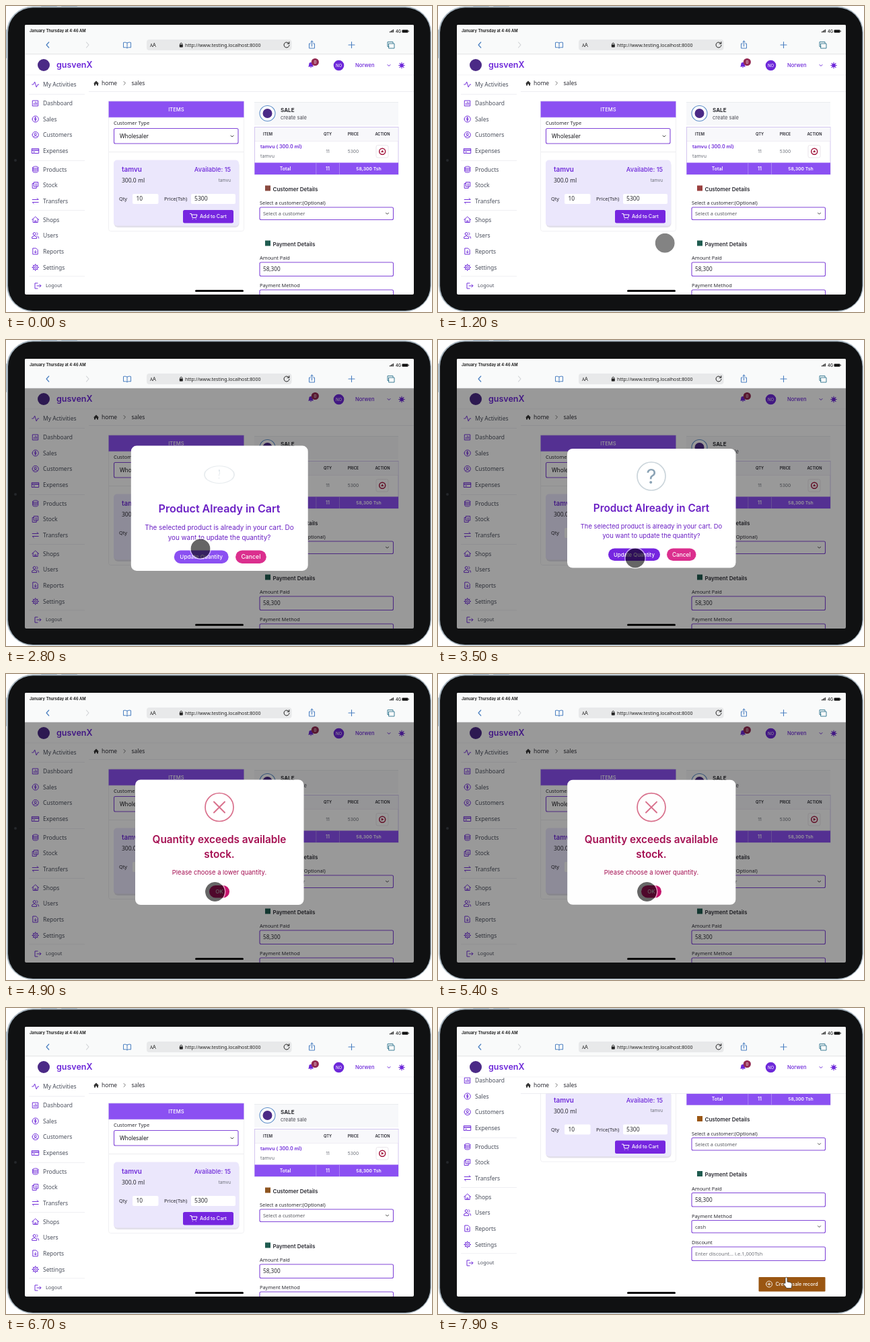
An HTML page for the animation above (8000 ms loop, 633 by 456 pixels).

```html
<!DOCTYPE html>
<html lang="en">
<head>
<meta charset="utf-8">
<title>Point of sale on a tablet</title>
<style>
html, body { margin: 0; width: 100%; height: 100%; overflow: hidden; background: #fff; }
svg { display: block; width: 633px; height: 456px; }
text { font-family: Inter, sans-serif; white-space: pre; }
.n { font-family: "Noto Sans", sans-serif; }
.d { font-weight: 500; }
.b { font-weight: 600; }
.m { text-anchor: middle; }
.e { text-anchor: end; }
</style>
</head>
<body>
<svg id="stage" viewBox="0 0 633 456"></svg>
<script>
const LOOP = 8000;
const PURPLE = '#6d28d9', VIOLET = '#8b50f2', BUTTON = '#7626e0', PRESSED = '#5c16c4';
const INK = '#2b2b33', GREY = '#6b6f78', BLUE = '#4a7fc1';
const BRAND = 'gusvenX', USER = 'Norwen', PRODUCT = 'tamvu';

// Drawing helpers
const text = (s, x, y, size, fill, cls = '') =>
  `<text x="${x}" y="${y}" font-size="${size}" fill="${fill}" class="${cls}">${s}</text>`;
const rect = (x, y, w, h, fill, r = 0, more = '') =>
  `<rect x="${x}" y="${y}" width="${w}" height="${h}" rx="${r}" fill="${fill}" ${more}/>`;
const circle = (x, y, r, fill, more = '') =>
  `<circle cx="${x}" cy="${y}" r="${r}" fill="${fill}" ${more}/>`;
const line = (d, color, width = 1, x = 0, y = 0) =>
  `<path d="${d}" transform="translate(${x} ${y})" fill="none" stroke="${color}" stroke-width="${width}" stroke-linecap="round" stroke-linejoin="round"/>`;
const group = (id, body, more = '') => `<g id="${id}" ${more}>${body}</g>`;
const stroke = (color, width = 1) => `stroke="${color}" stroke-width="${width}"`;
const chevron = (x, y, color = '#444') => line('M-2-1l2 2 2-2', color, 1, x, y);
const field = (x, y, w, h) => rect(x, y, w, h, '#fff', 2, stroke('#8146d8', 1.1));
const ring = r => `M${-r} 0a${r} ${r} 0 1 0 ${2 * r} 0a${r} ${r} 0 1 0 ${-2 * r} 0`;

const device =
  [52, 82].map(x => rect(x, 0, 24, 3, '#a3b6c6', 1)).join('') +
  rect(0, 35, 3, 43, '#b4c3cf', 1) +
  rect(1, .5, 631, 455, '#a7b5bf', 39) + rect(3, 2.5, 627.5, 451.5, '#101112', 37) +
  circle(14, 230, 2, '#24272b') + rect(28, 28, 578, 402, '#fff', 2);

const chrome =
  rect(28, 28, 578, 44, '#f9fafa', 2) + rect(28, 71.5, 578, .6, '#d4d6d8') +
  text('January Thursday at 4:46 AM', 35, 39, 5.8, '#111', 'b') +
  [0, 1, 2, 3].map(i => rect(570 + i * 1.6, 39 - i - 1, 1.1, i + 1.4, '#111')).join('') +
  text('4G', 579, 39.5, 5.8, '#111', 'd') + rect(588.5, 35.5, 9, 4.2, '#111', 1) + rect(598, 36.8, .8, 1.6, '#111') +
  line('M1.7-4l-3.6 4 3.6 4', BLUE, 1.2, 62, 58) + line('M-1.5-4l3.5 4-3.5 4', '#cfd2d5', 1.1, 121, 58) +
  line('M0-3q-3-1.6-5.5-.6v7.5q3-.8 5.5.6 2.500-1.400 5.500-.6v-7.500q-2.500-1-5.500.6v7.500', BLUE, 1, 180, 58) +
  rect(209, 50, 215.500, 16, '#e8e9ea', 4) +
  text('A', 214, 61, 6, '#222') + text('A', 217.800, 61, 7.600, '#222') +
  rect(257.800, 57.500, 5, 4, '#222', .8) + line('M-1.500 0v-1.500q1.500-2 3 0v1.500', '#222', .9, 260.300, 57.500) +
  text('http://www.testing.localhost:8000', 266, 61, 7.100, '#222', 'n') +
  line('M3.500-2a4 4 0 1 0 .5 2.500M3.800-4.500v2.700h-2.700', '#222', 1, 417, 58) +
  line('M-2-2h-2v7h8v-7h-2M0 2v-8M-2-4l2-2 2 2', BLUE, 1, 454.500, 58) +
  line('M-4.500 0h9M0-4.500v9', BLUE, 1.100, 513.500, 58) +
  line('M-3-2h8v7h-8zM-3 2.500h-2v-7h8v2', '#3f7f96', 1, 572, 58);

const sun = [0, 45, 90, 135].map(a =>
  `<path d="M-4.700 0h9.400" transform="translate(588 88.500) rotate(${a})" stroke="${PURPLE}" stroke-width="1.100"/>`).join('');

const header =
  rect(28, 72, 578, 31, '#fff') + rect(123, 103, 483, 24, '#fff') +
  rect(28, 102.500, 578, .7, '#eeeef2') + rect(123, 127, 483, .7, '#e6e6ec') +
  circle(56, 88, 9, '#4b2a86') + text(BRAND, 75, 92.300, 12.500, PURPLE, 'b') +
  `<path d="M449 90.500q1.200-1 1.200-3.500 0-3 2.800-3t2.800 3q0 2.500 1.200 3.500zM452 91.300h2q-1 1.700-2 0z" fill="${PURPLE}"/>` +
  circle(459.300, 83.500, 5.600, '#932a52') + text('0', 459.300, 85.700, 6, '#fff', 'm') +
  circle(494.500, 88.500, 7.800, PURPLE) + text('NO', 494.500, 90.800, 6, '#fff', 'm') +
  text(USER, 519, 91, 7.600, PURPLE, 'd') + chevron(569, 88.500, PURPLE) + sun + circle(588, 88.500, 2.600, PURPLE) +
  `<path d="M130 115.500l4-4 4 4h-1v3h-2v-2h-2v2h-2v-3z" fill="#333"/>` +
  text('home', 142, 118.200, 8.500, INK, 'n') + line('M-1.500-2.500l2.500 2.500-2.500 2.500', '#666', .9, 176.500, 115) +
  text('sales', 186.500, 118.200, 8.500, INK, 'n');

const menu = [
  ['My Activities', 117, 'M-5 0h2l2-4 2.500 8 2-4h1.500'],
  ['Dashboard', 145, 'M-4-4h8v8h-8zM-2 2v-2M0 2v-4M2 2v-3'],
  ['Sales', 168.500, ring(4.600) + 'M1.500-1.300c-1-1.200-3-.6-3 .3s3 .7 3 1.700-2 1.400-3 .3M0-3v6'],
  ['Customers', 192, ring(4.600) + 'M-1.500-1a1.500 1.500 0 1 0 3 0a1.500 1.500 0 1 0-3 0M-3 3c1-2 5-2 6 0'],
  ['Expenses', 216, 'M-5-3.500h10v7h-10zM-5-1h10M-5-1.500h10M-3 1.500h2'],
  ['Products', 243.500, 'M-4-3c0-2 8-2 8 0s-8 2-8 0v6c0 2 8 2 8 0v-6M-4-1c0 2 8 2 8 0M-4 1c0 2 8 2 8 0'],
  ['Stock', 267, 'M-2-4.500h6v6.500h-6zM-2-2.500h-2.500v7h6v-2.500M0-2h2M0 0h2'],
  ['Transfers', 290.500, 'M-4.500-2h9l-2-2M4.500 2h-9l2 2'],
  ['Shops', 318.500, 'M-5 0l5-4.500 5 4.500M-3.500-1v5h7v-5M-1 4v-2.500h2v2.500'],
  ['Users', 342, 'M-3.500-2.500a2 2 0 1 0 4 0a2 2 0 1 0-4 0M-5 4v-2q3.500-3 7 0v2zM2-4.500q3 2 0 4M3.500 1q1.500 1 1.500 3'],
  ['Reports', 365.500, 'M-3.500-4.500h4.500l2.500 2.500v6.500h-7zM0-1v3.500M-1.500 1l1.500 1.500 1.500-1.500'],
  ['Settings', 389.500, ring(3.600) + ring(1.500) + 'M0-3.600v-1.200M0 3.600v1.200M-3.600 0h-1.200M3.600 0h1.200M-2.600-2.600l-.8-.8M2.600 2.600l.8.8M2.600-2.600l.8-.8M-2.600 2.600l-.8.8']
];
const sidebar =
  menu.map(([label, y, icon]) => line(icon, PURPLE, .95, 43.700, y) + text(label, 55, y + 3, 8.500, '#4a4f5c', 'n')).join('') +
  line('M0-4h-4v8h4M-1 0h6l-2-2M5 0l-2 2', PURPLE, .95, 47, 417) + text('Logout', 59, 419.300, 7.300, '#4a4f5c', 'n') +
  [131, 230, 304, 402.500].map(y => rect(34, y, 83, .7, '#e9e9ee')).join('');

const items =
  rect(152.500, 141.500, 201, 194, '#fff', 3, stroke('#ececf0', .8)) +
  rect(152.500, 142, 201, 24, VIOLET, 0, stroke('#c9b6f3', .6)) + text('ITEMS', 253, 156.700, 7.600, '#fff', 'd m') +
  text('Customer Type', 160, 177, 7.500, INK, 'n') + field(160.500, 182.500, 184.500, 22.500) +
  text('Wholesaler', 169, 196.600, 8.200, '#15151a', 'n') + chevron(336, 194) + rect(153, 217, 200, .7, '#e6e6ea') +
  rect(160.500, 231, 186, 99, '#e2e0ea', 6) + rect(160, 229.500, 186, 98, '#ebe7fc', 5) +
  text(PRODUCT, 172, 247.300, 9.900, PURPLE, 'b') + text('Available: 15', 334, 247.200, 9.200, PURPLE, 'd e') +
  text('300.0 ml', 172, 263, 8.500, INK, 'n') + text(PRODUCT, 334, 261.700, 6.300, GREY, 'e') +
  text('Qty', 168, 290, 7.300, INK, 'n') + rect(188, 280, 38.500, 15, '#fff', 2) + text('10', 193.500, 290.400, 8.400, INK, 'n') +
  text('Price(Tsh)', 235, 290, 7.600, INK, 'n') + rect(275, 280, 66, 15, '#fff', 2) + text('5300', 280, 290.400, 8.600, INK, 'n') +
  rect(263, 304, 75, 19.500, BUTTON, 2.500, 'id="add"') +
  line('M-5-4h2l1.500 6h5.500l1.500-4.500h-8M-1.300 4.200h.1M3.700 4.200h.1', '#fff', 1, 278.500, 313.500) +
  text('Add to Cart', 288, 315.700, 7.300, '#fff', 'd');

const sale =
  rect(369, 143, 214, 35, '#f7f8fa') + rect(369, 143, 214, .7, '#e6e7eb') +
  circle(388.500, 160, 11.500, '#fff', stroke('#5e8fc9', 1.100)) + circle(388.500, 160, 7, '#4b2a86') +
  text('SALE', 408, 158, 8.100, '#16161c', 'b') + text('create sale', 408, 169, 7.500, '#4a4a52') +
  rect(369.500, 180.500, 213.500, 70.500, '#fff', 0, stroke('#cfc0ee', .9)) + rect(370, 181, 212.500, 20, '#f8f8fb') +
  text('ITEM', 382, 193, 5.700, INK, 'b') +
  [['QTY', 478], ['PRICE', 516], ['ACTION', 559.500]].map(([s, x]) => text(s, x, 193, 5.700, INK, 'b m')).join('') +
  rect(370, 201, 213, .6, '#e6e2ef') + text(`${PRODUCT} ( 300.0 ml)`, 378, 211.700, 7.200, PURPLE, 'b') +
  text(PRODUCT, 378, 226, 7.200, GREY) + text('11', 478, 219, 6.800, GREY, 'm') + text('5300', 516, 219, 6.600, GREY, 'm') +
  rect(550, 207.500, 18, 18.500, '#fff', 2.500, stroke('#e5dfe6', .8)) +
  group('action', circle(0, 0, 4.500, 'none', stroke('#a3173f', 1.500)) + '<path d="M0-2.300l2.100 3.700h-4.200z" fill="#a3173f"/>') +
  rect(369.500, 233.500, 213.500, 17.500, VIOLET) + [460.500, 495].map(x => rect(x, 234, .7, 17, '#b79af5')).join('') +
  text('Total', 415, 244.800, 6.900, '#fff', 'b m') + text('11', 478, 244.800, 6.900, '#fff', 'b m') + text('58,300 Tsh', 539, 244.800, 6.800, '#fff', 'b m');

const label = (s, y) => text(s, 377, y, 7.400, INK, 'n');
const formField = (s, y, h, color, size, select) =>
  field(377, y, 198.500, h) + text(s, 382, y + h / 2 + 2.800, size, color, 'n') + (select ? chevron(566.500, y + h / 2) : '');
const form =
  rect(385, 267.500, 8, 8, '#8a4a40', 0, 'id="swatch"') + text('Customer Details', 396.500, 275.700, 8.050, INK, 'b') +
  label('Select a customer:(Optional)', 296) + formField('Select a customer', 300, 18.500, '#55565e', 7.500, true) +
  rect(385, 349.500, 8, 8, '#1f5c50') + text('Payment Details', 396.500, 357.700, 8.050, INK, 'b') +
  label('Amount Paid', 378) + formField('58,300', 382, 20.500, INK, 8.200) +
  label('Payment Method', 419) + formField('cash', 423, 18.500, '#44454d', 7.500, true) +
  label('Discount', 458.500) + formField('Enter discount... i.e.1,000Tsh', 462.500, 20.500, '#70727a', 7.500) +
  rect(476.500, 507.500, 99, 21.500, '#99550f', 1, 'id="create"') +
  line(ring(4.500) + 'M-2 0h4M0-2v4', '#fff', .9, 492, 518) + text('Create sale record', 501.500, 520.600, 7.200, '#fff', 'd');

const DEEP = '#6a1fc4', CRIMSON = '#a50f52';
const question =
  rect(192, 162, 250.500, 177.500, '#fff', 8) +
  group('askIcon', circle(317, 203, 21, 'none', stroke('#cbd5db', 1.700)) + group('askMark', text('?', 317, 213.500, 30, '#8ba3b5', 'm'))) +
  text('Product Already in Cart', 317, 256.300, 15.300, DEEP, 'b m') +
  text('The selected product is already in your cart. Do', 317, 281.300, 9.400, DEEP, 'm') +
  text('you want to update the quantity?', 317, 295.300, 9.400, DEEP, 'm') +
  rect(253, 310.500, 77, 18.500, VIOLET, 9.250, 'id="update"') + text('Update Quantity', 291.500, 322.600, 7.800, '#fff', 'd m') +
  rect(340, 310.500, 43.500, 18.500, '#db2f8e', 9.250) + text('Cancel', 361.700, 322.800, 8.300, '#fff', 'd m');
const error =
  rect(192, 157.500, 250.500, 186.500, '#fff', 8) +
  group('errIcon', circle(317, 198.500, 21, 'none', stroke('#d9708c', 1.700)) + group('errMark', line('M-8-8L8 8M8-8L-8 8', '#d9708c', 2, 317, 198.500))) +
  text('Quantity exceeds available', 317, 252.300, 15.300, CRIMSON, 'b m') + text('stock.', 317, 274.300, 15.300, CRIMSON, 'b m') +
  text('Please choose a lower quantity.', 317, 299.200, 9.400, CRIMSON, 'm') +
  rect(302, 315, 30, 18.500, '#c5146c', 9.250) + text('OK', 317, 327, 7.800, '#fff', 'd m');

document.getElementById('stage').innerHTML =
  `<clipPath id="mainClip">${rect(123, 127.500, 483, 302.500, '#000')}</clipPath>` +
  `<clipPath id="sideClip">${rect(28, 103, 95, 327, '#000')}</clipPath>` + device +
  `<g clip-path="url(#mainClip)">${group('main', items + sale + form)}</g>` +
  `<g clip-path="url(#sideClip)">${group('side', sidebar)}</g>` + header +
  rect(28, 72, 578, 358, '#000', 0, 'id="shade"') + chrome + rect(281, 423, 72, 3, '#0a0a0a', 1.500) +
  group('ask', question) + group('err', error) +
  group('touch', circle(0, 0, 14.500, '#000', 'fill-opacity=".6"') + circle(0, 0, 15.200, 'none', stroke('#fff', 1.400) + ' stroke-opacity=".6"')) +
  group('hand', '<path d="M-1.500 1q1.500-2.500 3 0v5.500l5 1q2.500 1 2 4l-1 4.500h-7l-4.500-6q0-2.500 2.500-1.300z" fill="#fff" stroke="#333" stroke-width=".8"/>');

// Motion helpers: the CSS "ease" curve, and keyframes [time, ...values]
function ease(p) {
  let lo = 0, hi = 1;
  for (let i = 0; i < 14; i++) {
    const u = (lo + hi) / 2, v = 1 - u;
    if (.75 * u * v + u ** 3 < p) lo = u; else hi = u;
  }
  const v = 1 - lo;
  return .3 * lo * v * v + 3 * lo * lo * v + lo ** 3;
}
function track(t, ...keys) {
  const next = keys.findIndex(k => k[0] > t);
  if (next === 0) return keys[0].slice(1);
  if (next < 0) return keys[keys.length - 1].slice(1);
  const a = keys[next - 1], b = keys[next], p = ease((t - a[0]) / (b[0] - a[0]));
  return a.slice(1).map((v, i) => v + (b[i + 1] - v) * p);
}
const set = (id, attrs) => {
  const el = document.getElementById(id);
  for (const name in attrs) el.setAttribute(name, attrs[name]);
};
const scaleAt = (x, y, sx, sy = sx) => `translate(${x} ${y}) scale(${sx} ${sy}) translate(${-x} ${-y})`;
const cos = deg => Math.cos(deg * Math.PI / 180);

function popup(id, t, open, close, iconY) {
  const s = t - open, end = close - open;
  const [scale] = track(s, [0, .7], [135, 1.05], [240, .95], [300, 1], [end, 1], [end + 150, .5]);
  const [alpha] = track(s, [end, 1], [end + 150, 0]);
  set(id, { transform: scaleAt(317.2, 250.7, scale), opacity: s < 0 ? 0 : alpha });
  const [tilt, iconAlpha] = track(s, [0, 100, 0], [500, 0, 1]);
  set(id + 'Icon', { transform: scaleAt(317, iconY, 1, cos(tilt)), opacity: iconAlpha });
}

function draw(now) {
  const t = now % LOOP;
  popup('ask', t, 2665, 4200, 203);
  popup('err', t, 4380, 5400, 198.5);
  set('askMark', { transform: scaleAt(317, 203, cos(track(t, [2665, -360], [3465, 0])[0]), 1) });
  const [cross, crossAlpha] = track(t, [4630, .4, 0], [4780, 1.15, 1], [4880, 1, 1]);
  set('errMark', { transform: scaleAt(317, 198.5, cross), opacity: crossAlpha });
  set('shade', { opacity: track(t, [2665, 0], [2765, .4], [4250, .4], [4350, 0], [4380, 0], [4480, .4], [5400, .4], [5550, 0])[0] });

  const [x, y] = track(t, [1100, 345, 360], [1900, 289, 311], [2900, 289, 311], [3500, 293, 325],
    [4350, 293, 325], [4850, 310.5, 324.5], [5450, 310.5, 324.5], [6000, 394, 319]);
  const [alpha] = track(t, [1100, 0], [1300, 1], [6500, 1], [6700, 0]);
  set('touch', { transform: `translate(${x} ${y})`, opacity: alpha });
  const [hx, hy] = track(t, [7400, 394, 319], [7880, 517.5, 401.5]);
  set('hand', { transform: `translate(${hx} ${hy})`, opacity: t < 7400 ? 0 : 1 });

  set('add', { fill: t > 1800 && t < 2900 ? PRESSED : BUTTON });
  set('update', { fill: t > 3050 ? BUTTON : VIOLET });
  const [mainY, sideY] = track(t, [7400, 0, 0], [7880, -106.5, -37]);
  set('main', { transform: `translate(0 ${mainY})` });
  set('side', { transform: `translate(0 ${sideY})` });
  set('action', { transform: `translate(559.2 216.7) rotate(${track(t, [4200, 0], [4900, 90])[0]})` });
  const tone = track(t, [0, 138, 74, 64], [2000, 156, 63, 63], [6000, 122, 84, 56], [7900, 154, 86, 18]);
  set('swatch', { fill: `rgb(${tone})` });
  set('create', { fill: `rgb(${tone})` });
}
(function frame() {
  draw(performance.now());
  requestAnimationFrame(frame);
})();
</script>
</body>
</html>
```
